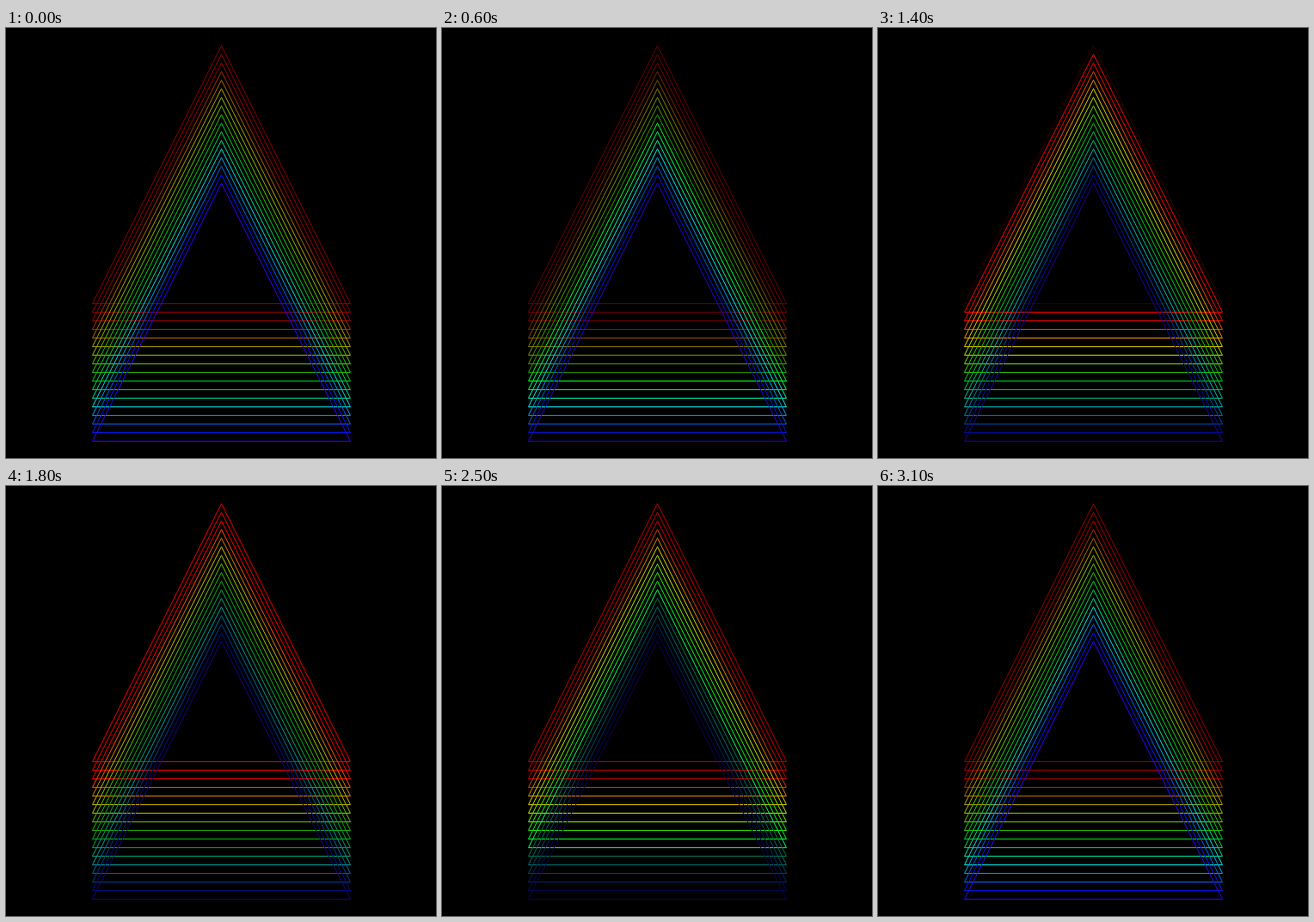
An HTML page without scripts for the animation above (3200 ms loop, 500 by 500 pixels).

```html
<!DOCTYPE html>
<html lang="en">
<head>
<meta charset="utf-8">
<title>Rainbow triangles</title>
<style>
  @property --down { syntax: "<number>"; inherits: true; initial-value: 0; }
  @property --up { syntax: "<number>"; inherits: true; initial-value: 0; }

  html, body { margin: 0; width: 100%; height: 100%; overflow: hidden; background: #000; }
  svg { display: block; width: 100%; height: 100%; }

  /* A pulse runs up the stack and back down; each pass lights a line, which then fades. */
  .line {
    --hue: max(0, var(--i) * 18 - 36);
    --glow: max(var(--up), var(--down));
    fill: none;
    stroke: hsl(calc(var(--hue)) 100% calc(var(--glow) * 50%));
    stroke-width: 1;
    transform: translateY(calc(var(--i) * 10px));
    animation: up 3.2s steps(32) infinite, down 3.2s steps(32) infinite;
    animation-delay:
      calc((15 - var(--i)) * .1s - 3.204s),
      calc((15 + var(--i)) * .1s - 3.204s);
  }
  @keyframes up { from { --up: 1; } to { --up: .168; } }
  @keyframes down { from { --down: 1; } to { --down: .168; } }
</style>
</head>
<body>
<svg viewBox="0 0 500 500">
  <defs>
    <path id="tri" d="M250.5 20.5L400.5 320.5H100.5Z"/>
  </defs>
  <use class="line" href="#tri" style="--i:0"/>
  <use class="line" href="#tri" style="--i:1"/>
  <use class="line" href="#tri" style="--i:2"/>
  <use class="line" href="#tri" style="--i:3"/>
  <use class="line" href="#tri" style="--i:4"/>
  <use class="line" href="#tri" style="--i:5"/>
  <use class="line" href="#tri" style="--i:6"/>
  <use class="line" href="#tri" style="--i:7"/>
  <use class="line" href="#tri" style="--i:8"/>
  <use class="line" href="#tri" style="--i:9"/>
  <use class="line" href="#tri" style="--i:10"/>
  <use class="line" href="#tri" style="--i:11"/>
  <use class="line" href="#tri" style="--i:12"/>
  <use class="line" href="#tri" style="--i:13"/>
  <use class="line" href="#tri" style="--i:14"/>
  <use class="line" href="#tri" style="--i:15"/>
  <use class="line" href="#tri" style="--i:16"/>
</svg>
</body>
</html>
```
